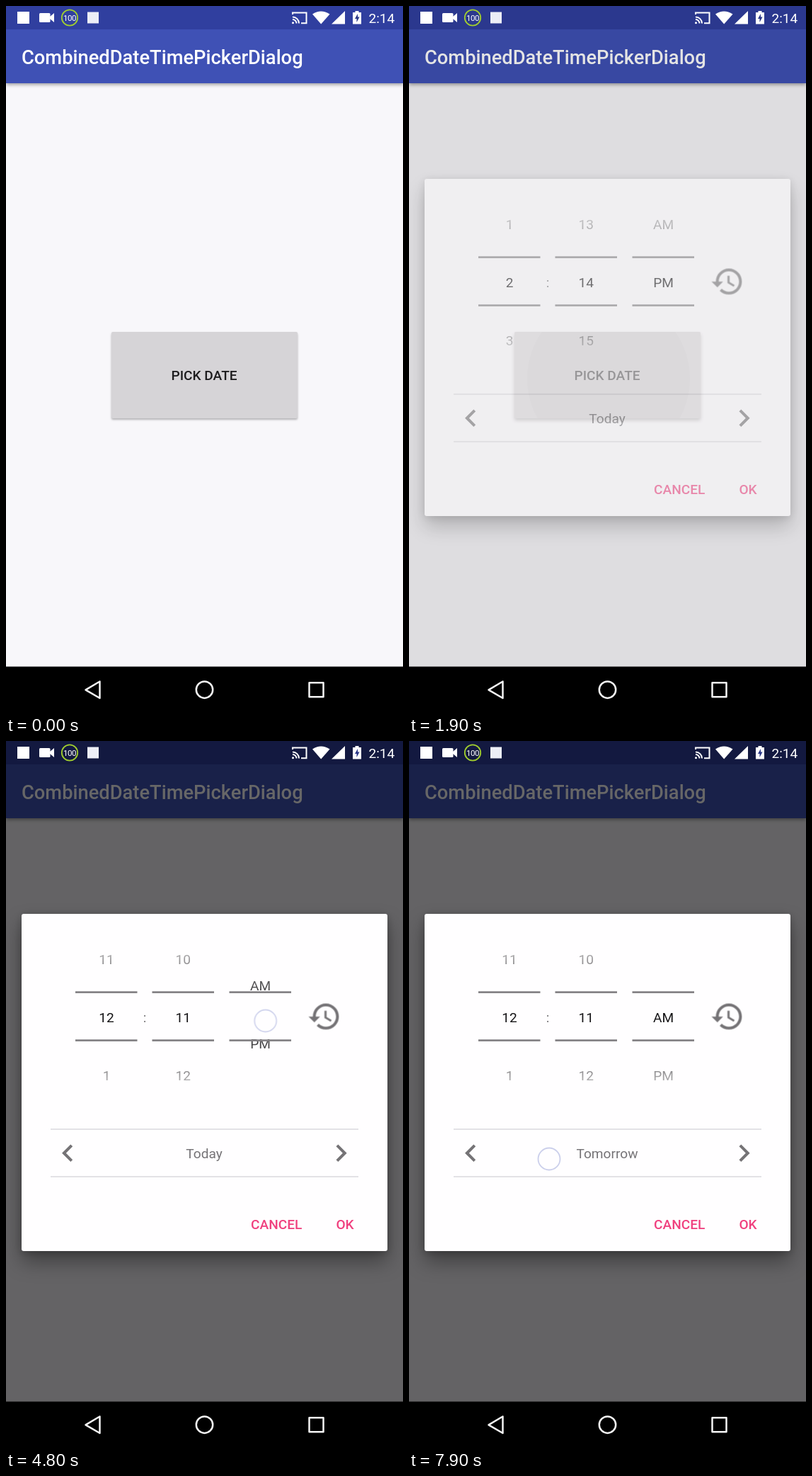
These frames come from a looping animation (561 by 998 pixels, 8 s). An HTML page:

```html
<!DOCTYPE html>
<html lang="en">
<head>
<meta charset="utf-8">
<title>Date and time picker</title>
<style>
html, body { margin: 0; width: 100%; height: 100%; overflow: hidden; background: #000; }
.stage { position: relative; width: 561px; height: 998px; overflow: hidden; background: #f8f7fa; }
.stage > *, .dialog > svg { position: absolute; left: 0; top: 0; }
svg { display: block; width: 561px; height: 998px; }
text { font: 400 19.1px Roboto, sans-serif; }
.med { font-weight: 500; }
.mid text, .mid { text-anchor: middle; }

.appbar { top: 33px; width: 561px; height: 75.5px; background: #3f51b5; box-shadow: 0 2px 5px rgba(0,0,0,.38); }
.statusbar { width: 561px; height: 33px; background: #303f9f; }
.button { left: 149px; top: 460px; width: 262.5px; height: 121.5px; border-radius: 2px; background: #d6d4d7;
  box-shadow: 0 2px 3px rgba(0,0,0,.28); }
.scrim { width: 561px; height: 932.5px; background: #000; }
.dialog { width: 561px; height: 998px; }
.card { position: absolute; left: 22px; top: 244px; width: 516.5px; height: 476px; border-radius: 3px; background: #fffeff;
  box-shadow: 0 15px 28px rgba(0,0,0,.36), 0 2px 12px rgba(0,0,0,.22); }

.button, .scrim, .dialog, .anim { animation: 8s step-end -.03s infinite; }
.button { animation-name: press; }
.scrim { animation-name: dim; }
.dialog { animation-name: open; }
.ripple { animation-name: ripple; }
.hours { animation-name: hours; }
.minutes { animation-name: minutes; }
.halves { animation-name: halves; }
.days { animation-name: days; }
.halo { animation-name: halo; }
.wave { animation-name: wave; }
.touch { animation-name: touch; }

@keyframes press {
  0% { background: #d6d4d7; }
  21.25% { background: #d0ced1; }
  22.5%, 100% { background: #cac8cb; box-shadow: 0 3px 5px rgba(0,0,0,.32); }
}
@keyframes ripple {
  0% { transform: translate(282px, 532px) scale(0); opacity: 1; }
  21.25% { transform: translate(282px, 532px) scale(45); opacity: 1; }
  22.5% { transform: translate(282px, 531px) scale(76); opacity: 1; }
  23.75% { transform: translate(282px, 526px) scale(115); opacity: .6; }
  25%, 100% { transform: translate(282px, 521px) scale(140); opacity: 0; }
}
@keyframes dim {
  0% { opacity: 0; }
  23.75% { opacity: .105; }
  25%, 100% { opacity: .595; }
}
@keyframes open {
  0% { opacity: 0; }
  23.75% { opacity: .55; }
  25%, 100% { opacity: 1; }
}
@keyframes hours {
  0%, 31.25% { transform: translateY(0); animation-timing-function: step-end; }
  32.5% { transform: translateY(10px); animation-timing-function: steps(3); }
  36.25% { transform: translateY(115px); animation-timing-function: steps(2); }
  38.75% { transform: translateY(147px); animation-timing-function: steps(4); }
  43.75% { transform: translateY(160px); animation-timing-function: steps(3); }
  47.5% { transform: translateY(163.4px); }
  48.75%, 100% { transform: translateY(164px); }
}
@keyframes minutes {
  0%, 48.75% { transform: translateY(0); }
  50% { transform: translateY(15px); animation-timing-function: steps(3); }
  53.75% { transform: translateY(165px); animation-timing-function: steps(2); }
  56.25% { transform: translateY(225px); animation-timing-function: steps(2); }
  58.75% { transform: translateY(244px); }
  60%, 100% { transform: translateY(246px); }
}
@keyframes halves {
  0%, 57.5% { transform: translateY(0); }
  58.75% { transform: translateY(15px); animation-timing-function: steps(2); }
  61.25% { transform: translateY(60px); animation-timing-function: steps(2); }
  63.75% { transform: translateY(79px); }
  65%, 100% { transform: translateY(82px); }
}
@keyframes days {
  0%, 73.75% { transform: translateX(0); }
  75% { transform: translateX(150px); }
  76.25% { transform: translateX(281.5px); }
  77.5% { transform: translateX(327px); }
  78.75%, 82.5% { transform: translateX(339px); }
  83.75% { transform: translateX(282px); animation-timing-function: steps(2); }
  86.25% { transform: translateX(90px); }
  87.5% { transform: translateX(22px); }
  88.75%, 91.25% { transform: translateX(0); }
  92.5% { transform: translateX(-75px); }
  93.75% { transform: translateX(-220px); }
  95% { transform: translateX(-312px); }
  96.25% { transform: translateX(-335px); }
  97.5%, 100% { transform: translateX(-339px); }
}
@keyframes halo {
  0% { opacity: 0; }
  73.75% { opacity: .5; }
  75% { opacity: 1; }
  77.5% { opacity: .5; }
  78.75%, 100% { opacity: 0; }
}
@keyframes wave {
  0% { transform: translate(80px, 594px) scale(0); opacity: 1; }
  73.75% { transform: translate(81px, 591px) scale(10); opacity: 1; }
  75% { transform: translate(83px, 588px) scale(18); opacity: 1; }
  76.25% { transform: translate(85px, 585px) scale(27); opacity: 1; }
  77.5% { transform: translate(87px, 582px) scale(33); opacity: .4; }
  78.75%, 100% { transform: translate(87px, 582px) scale(35); opacity: 0; }
}
@keyframes touch {
  0% { transform: translate(283px, 535px); opacity: 0; }
  20% { transform: translate(283px, 535px); opacity: 1; }
  22.5% { transform: translate(283px, 535px); opacity: .8; }
  23.75% { transform: translate(283px, 535px); opacity: 0; }
  31.25% { transform: translate(152px, 365px); opacity: 1; animation-timing-function: steps(3); }
  35% { transform: translate(154px, 445px); opacity: .8; }
  36.25% { transform: translate(154px, 445px); opacity: 0; }
  48.75% { transform: translate(258px, 350px); opacity: 1; animation-timing-function: steps(3); }
  52.5% { transform: translate(260px, 460px); opacity: .8; }
  53.75% { transform: translate(260px, 460px); opacity: 0; }
  57.5% { transform: translate(366px, 355px); opacity: 1; animation-timing-function: steps(3); }
  61.25% { transform: translate(367px, 415px); opacity: .8; }
  62.5% { transform: translate(367px, 415px); opacity: 0; }
  72.5% { transform: translate(78px, 598px); opacity: 1; }
  76.25% { transform: translate(78px, 598px); opacity: .65; }
  77.5% { transform: translate(78px, 598px); opacity: 0; }
  82.5% { transform: translate(477px, 582px); opacity: 1; }
  83.75% { transform: translate(420px, 583px); opacity: 1; animation-timing-function: steps(2); }
  86.25% { transform: translate(225px, 586px); opacity: .6; }
  87.5% { transform: translate(225px, 586px); opacity: 0; }
  91.25% { transform: translate(487px, 585px); opacity: 1; }
  92.5% { transform: translate(412px, 586px); opacity: 1; animation-timing-function: steps(2); }
  95% { transform: translate(70px, 590px); opacity: .6; }
  96.25% { transform: translate(70px, 590px); opacity: 0; }
  98.75%, 100% { transform: translate(198px, 590px); opacity: 1; }
}
</style>
</head>
<body>
<div class="stage">
  <div class="appbar"></div>
  <div class="statusbar"></div>
  <div class="button"></div>
  <svg viewBox="0 0 561 998">
    <clipPath id="face"><rect x="149" y="460" width="262.5" height="121.5" rx="2"/></clipPath>
    <g clip-path="url(#face)"><circle class="anim ripple" r="1" fill="#c1bfc2"/></g>
    <text class="med" x="22" y="81.5" fill="#fff" style="font-size:27.3px">CombinedDateTimePickerDialog</text>
    <text class="med mid" x="280" y="528.3" fill="#1d1c1e">PICK DATE</text>
  </svg>
  <div class="scrim"></div>

  <div class="dialog">
    <div class="card"></div>
    <svg viewBox="0 0 561 998">
      <defs>
        <linearGradient id="fade" gradientUnits="userSpaceOnUse" x1="0" y1="260" x2="0" y2="520">
          <stop offset="0" stop-color="#fff" stop-opacity="0"/>
          <stop offset=".44" stop-color="#fff"/>
          <stop offset=".56" stop-color="#fff"/>
          <stop offset="1" stop-color="#fff" stop-opacity="0"/>
        </linearGradient>
        <mask id="wheel" maskUnits="userSpaceOnUse" x="90" y="260" width="320" height="260">
          <rect x="90" y="260" width="320" height="260" fill="url(#fade)"/>
        </mask>
        <clipPath id="pager"><rect x="111" y="549" width="339" height="65"/></clipPath>
      </defs>

      <g class="mid" mask="url(#wheel)" fill="#141315">
        <g class="anim hours">
          <text x="142" y="68.7">10</text>
          <text x="142" y="150.7">11</text>
          <text x="142" y="232.7">12</text>
          <text x="142" y="314.7">1</text>
          <text x="142" y="396.7">2</text>
          <text x="142" y="478.7">3</text>
        </g>
        <g class="anim minutes">
          <text x="250.3" y="68.7">10</text>
          <text x="250.3" y="150.7">11</text>
          <text x="250.3" y="232.7">12</text>
          <text x="250.3" y="314.7">13</text>
          <text x="250.3" y="396.7">14</text>
          <text x="250.3" y="478.7">15</text>
        </g>
        <g class="anim halves">
          <text x="359.5" y="314.7">AM</text>
          <text x="359.5" y="396.7">PM</text>
        </g>
      </g>
      <path d="M98 354.7h87.5M206.5 354.7H294M315.5 354.7H403M98 422.7h87.5M206.5 422.7H294M315.5 422.7H403"
        stroke="#858386" stroke-width="2.7"/>
      <text class="mid" x="196" y="396.7" fill="#757376">:</text>

      <path d="M63 548h435M63 615h435" stroke="#dad9de" stroke-width="1.6"/>
      <circle class="anim halo" cx="87" cy="582" r="34" fill="#faf9fb"/>
      <circle class="anim wave" r="1" fill="#efedf0"/>
      <g fill="#757376">
        <path transform="translate(425.4 364.4) scale(2.045)" d="M13 3c-4.97 0-9 4.03-9 9H1l3.89 3.89.07.14L9 12H6c0-3.87 3.13-7 7-7s7 3.13 7 7-3.13 7-7 7c-1.93 0-3.68-.79-4.94-2.06l-1.42 1.42C8.27 19.99 10.51 21 13 21c4.97 0 9-4.03 9-9s-4.03-9-9-9zm-1 5v5l4.28 2.54.72-1.21-3.5-2.08V8z"/>
        <path transform="translate(62.7 557.2) scale(2.045)" d="M15.41 7.41L14 6l-6 6 6 6 1.41-1.41L10.83 12z"/>
        <path transform="translate(448.9 557.2) scale(2.045)" d="M10 6L8.59 7.41 13.17 12l-4.58 4.59L10 18l6-6z"/>
        <g class="mid" clip-path="url(#pager)">
          <g class="anim days">
            <text x="-59" y="588.8">Yesterday</text>
            <text x="280" y="588.8">Today</text>
            <text x="619" y="588.8">Tomorrow</text>
          </g>
        </g>
      </g>
      <g class="mid" fill="#f0407f">
        <text class="med" x="382.2" y="689.3">CANCEL</text>
        <text class="med" x="479" y="689.3">OK</text>
      </g>
    </svg>
  </div>

  <svg viewBox="0 0 561 998">
    <g fill="#fff">
      <rect x="16" y="8" width="17" height="17"/>
      <rect x="47" y="10" width="15.5" height="13" rx="1.5"/>
      <path d="M62 15l6-5v13l-6-5z"/>
      <rect x="115" y="8.5" width="16" height="16" fill="#eceef6"/>
      <path d="M433 11.5Q445 3.5 457.5 11.5L445.2 25.5z"/>
      <path d="M479 7v18.5h-19z"/>
      <path d="M490 9h3.5V7h5v2h3.500v16.500h-12z"/>
      <text x="512.500" y="23.800">2:14</text>
      <text class="mid" x="90" y="20.600" style="font-size:11.500px;letter-spacing:-.5px">100</text>
    </g>
    <path d="M497 11l-4 7h2.500v5l4-7.500H497z" fill="#2a3787"/>
    <circle cx="90" cy="16.500" r="11.200" fill="none" stroke="#a2cf2e" stroke-width="1.800"/>
    <g fill="none" stroke="#fff" stroke-width="2">
      <path d="M405 12V9.500h19.500v14.800H417M405 15.500a9 9 0 0 1 9 9M405 19a5.500 5.500 0 0 1 5.500 5.500"/>
    </g>
    <circle cx="405.500" cy="23.800" r="1.500" fill="#fff"/>

    <path d="M0 932.500h561V998H0z"/>
    <g fill="none" stroke="#f4f4f4" stroke-width="2.500" stroke-linejoin="round">
      <path d="M112.500 965.300L132.500 953.500v23.500z"/>
      <circle cx="280.500" cy="965.200" r="11.700"/>
      <rect x="428.500" y="955.200" width="20" height="20"/>
    </g>
    <circle class="anim touch" r="15.500" fill="#fff" fill-opacity=".3" stroke="#3f51b5" stroke-opacity=".27" stroke-width="1.800"/>
  </svg>
</div>
</body>
</html>
```
